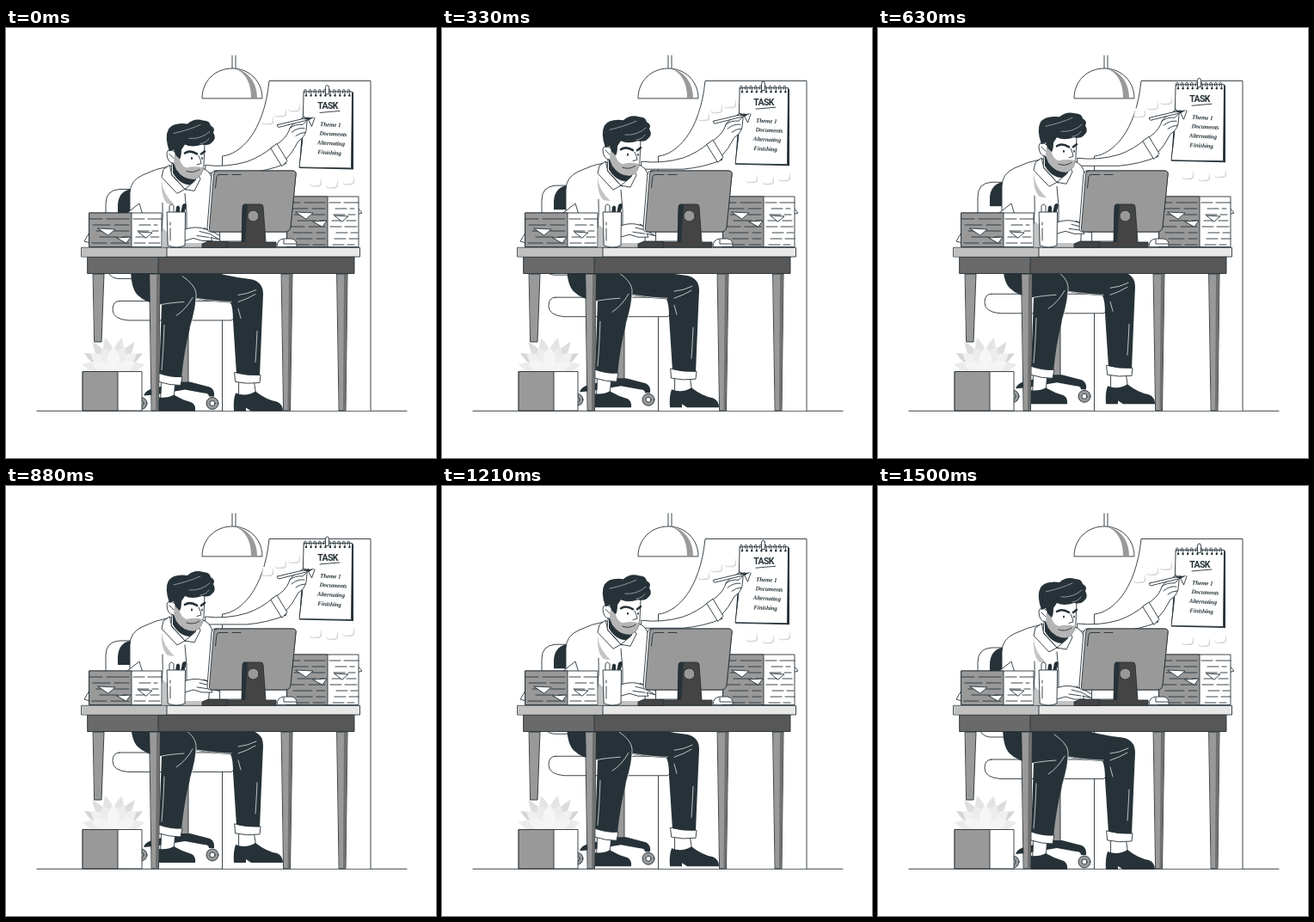
Recreate the animation shown at these times as an HTML page. Size 500x500 px, loop 1.54 s.

```html
<!DOCTYPE html>
<html lang="en">
<head>
<meta charset="utf-8">
<title>Office tasks</title>
<style>
  html, body { margin: 0; width: 100%; height: 100%; overflow: hidden; background: #fff; }
  svg { display: block; width: 100%; height: 100%; }
  svg * { stroke-linejoin: round; stroke-linecap: round; }
  .o { fill: #fff; stroke: #263238; stroke-width: .9; }
  .d { fill: #263238; }
  .g { fill: #999; stroke: #263238; stroke-width: .9; }
  .m { fill: #999; }
  .l { fill: none; stroke: #263238; stroke-width: .9; }
  .f { fill: none; stroke: #fff; stroke-width: .7; }
  .s { fill: #c4c4c4; }
  .title { font: 700 10.5px Roboto, sans-serif; font-stretch: 75%; letter-spacing: -.7px; fill: #263238; }
  .hand { font: italic 700 7px "Liberation Serif", cursive; letter-spacing: -.1px; fill: #263238; }
</style>
</head>
<body>
<svg viewBox="0 0 500 500">
  <!-- wall and lamp -->
  <path class="l" d="M36 445.3H466"/>
  <path class="o" d="M251.500 445V149C272 147 300 122 306 61.500H424V445"/>
  <path class="l" d="M263 32V47M267 32V47"/>
  <path class="o" d="M228 81.500C228 62 243 47 263 47S298 62 298 81.500Z"/>
  <path class="m" d="M267 47.500C280 53 285 66 285 81H292C292 66 284 51 267 47.500Z"/>

  <g id="float">
    <g id="notes"></g>

    <!-- notepad -->
    <path class="d" d="M347 74.500H404V164L341 162.500Z"/>
    <path class="o" d="M346.500 73.500H402.500L401.500 162.500L341 161.500Q346 130 345.500 100Z"/>
    <g id="rings"></g>
    <path class="o" d="M371.500 76V69Q371.500 66 373.500 66T375.500 69V76Z"/>
    <text class="title" x="374" y="94" text-anchor="middle">TASK</text>
    <path class="l" d="M365 98Q376 97 388 96"/>
    <g class="hand" transform="rotate(3 365 113)">
      <text x="365" y="113.500">Theme 1</text>
      <text x="365" y="124">Documents</text>
      <text x="363" y="135">Alternating</text>
      <text x="364" y="146">Finishing</text>
    </g>
    <path class="l" d="M352 107L355.500 114L359 104"/>

    <!-- chair -->
    <path class="o" d="M116 275V204Q116 188 132 187H150V291H130Q118 290 116 275Z"/>
    <path class="d" d="M130 215V205Q131 190 144 187H152V215Z"/>
    <path class="g" d="M203 340H212V413H203Z"/>
    <path class="d" d="M160 427Q162 420 174 418L200 411H214L237 417Q243 420 242 428H236Q236 424 230 424L208 420L172 426Z"/>
    <g class="g"><circle cx="240" cy="436" r="7"/><circle cx="157" cy="436" r="7"/></g>
    <g class="o"><circle cx="240" cy="436" r="3"/><circle cx="157" cy="436" r="3"/></g>
    <path class="o" d="M132 317H262Q269 318 269 327T262 339.500H142Q124 338 124 327Q124 317 132 317Z"/>

    <!-- legs and shoes -->
    <path class="o" d="M181 408H197L195 432H180ZM271 408H288L291 428H271Z"/>
    <path class="d" d="M178 429Q188 430 195 426Q205 432 216 435Q221 438 220 445H178ZM267 424Q279 429 290 422Q303 432 315 434Q322 437 322 445H285L279 441V445H265Q264 432 267 424Z"/>
    <path class="d" d="M185 278H222Q258 289 284 291.500Q299 294 299 309Q297 354 295 405L268 402L264 340Q264 324 261 319Q238 318 218 314Z"/>
    <path class="d" d="M145 278H205Q219 294 221 306Q222 322 214 348Q207 375 204 407L178 402L181 321Q163 320 153 310Q145 302 145 278Z"/>
    <path class="f" d="M205 288Q220 298 221 308Q222 322 214 348M181 321Q191 319 207 318M184 345Q183 375 181 397M198 334Q209 327 217 313M222 314Q247 318 262 318M270 310Q281 309 291 304M270 318Q282 314 290 309M292 352Q291 375 290 388M273 337L270 326"/>
    <path class="o" d="M178 401Q191 406 205 405L203 415Q190 415 178 411ZM266 400Q280 404 296 403L295 412Q280 414 267 411Z"/>

    <!-- raised arm and shirt -->
    <path class="o" d="M232 159Q256 162 280 155Q297 149 311 137L326 157Q304 166 280 168H232Z"/>
    <path class="o" d="M313 136Q325 129 329 119Q330 113 338 109L346 103Q351 103 350 109L349 119Q347 127 340 131Q333 145 325 153Z"/>
    <path class="o" d="M308 139L315 134L327 154L321 160Z"/>
    <path class="o" d="M316 112L352 103.500L353 106L317 115Q314 114 316 112Z"/>
    <path class="d" d="M344 105L359 103L352 106.500Z"/>
    <path class="l" d="M330 116Q336 111 345 112L349 108M332 121Q339 115 347 116M337 125Q342 121 348 121"/>
    <path class="o" d="M144 270V192Q144 177 159 170.500Q174 163 191 160L226 162Q239 165 240 178L235 270Z"/>
    <path class="s" d="M181 177Q182 192 196 205L188 204Q180 197 181 177ZM182 232L191 240L188 270H182Z"/>
    <path class="l" d="M208 192Q211 215 210 238M182 203Q183 219 181 236"/>
    <path class="o" d="M193 157L192 169L209 188L222 179V168Z"/>
    <path class="d" d="M194 157L194 168Q202 182 215 182L221 175Z"/>
    <path class="o" d="M190 159L183 164L181 173L199 192L208 187L193 171ZM222 166L226 175L219 189L208 187L220 177Z"/>

    <!-- head -->
    <path class="o" d="M197 134H231L230 158Q229 172 219 175.500Q206 176 198 164L195 157Q187 156 187 145Q188 138 197 144Z"/>
    <path class="s" style="fill:#b5b5b5" d="M196 146L201 149Q203 160 210 162Q217 160 225 161Q229 163 230 159Q229 172 219 175.500Q206 176 198 164L195 156Z"/>
    <path class="l" d="M210 166Q218 169 225 164"/>
    <path class="d" d="M190 143Q184 126 189 117Q195 109 211 111Q219 104 229 107Q237 107 238 113Q244 116 241 121Q245 128 240 132Q236 137 228 135Q216 139 208 135L204 141Q204 149 202 152L197 147L195 141Z"/>
    <path class="f" stroke-opacity=".7" d="M195 122Q213 118 226 112M213 128Q227 129 237 120M226 134Q233 133 236 128"/>
    <path d="M208 145Q214 141 222 146M227 146L231 143" fill="none" stroke="#263238" stroke-width="2.600"/>
    <path class="l" d="M224 148Q227 154 227 157L222 158.500M190 146L195 151"/>
    <g class="d"><ellipse cx="216" cy="151" rx="1" ry="1.600"/><ellipse cx="228" cy="151" rx=".8" ry="1.500"/></g>

    <!-- typing hand -->
    <path class="o" d="M204 235Q217 230 226 232L238 235L250 242Q251 246 246 245L238 243L240 247H228L218 244L204 248Z"/>
    <path class="l" d="M225 236L237 239L247 245M222 241L236 243M230 232L241 237"/>
  </g>

  <!-- desk -->
  <path class="s" d="M183 250H229V255H183Z"/>
  <path class="g" d="M101.500 286H114L111 365H103ZM320.500 286H333L330.500 445H323ZM385 286H397L395 445H387.500ZM167 286H179L177.500 445H169.500Z"/>
  <path d="M175 287L174 445H177L179 287ZM329 287L327.500 445H330L333 287ZM393 287L392 445H395L397 287Z" fill="#707070"/>
  <path d="M95 266H405V285.500H95Z" fill="#575757" stroke="#263238" stroke-width=".9"/>
  <path d="M95.500 266.500H177V285H95.500Z" fill="#6a6a6a"/>
  <path class="l" d="M177 266V286"/>
  <path d="M88 255.300H411.500V266H88Z" fill="#e8e8e8" stroke="#263238" stroke-width=".9"/>
  <path d="M88.500 255.800H187V265.500H88.500Z" fill="#c0c0c0"/>
  <path class="l" d="M187 255.500V266"/>

  <!-- paper stacks -->
  <path class="o" d="M141 215L155 204L159 217ZM97 238L91 248L98 250ZM408 208L414 215L408 217Z"/>
  <g id="stacks"></g>

  <!-- computer -->
  <path d="M228 255V251L235 248H258V255Z" fill="#444" stroke="#263238" stroke-width=".9"/>
  <path class="o" d="M249 234H276V248H249ZM315 254Q315 246 323 245H332Q339 246 338 254Z"/>
  <path class="l" d="M323 246V251H337"/>
  <path class="o" d="M243 166H333Q338 166 337 171L331 231Q330 237 325 237H238Q234 237 234 232L239 170Q240 166 243 166Z"/>
  <path class="g" d="M245 166H333Q338 166 337 171L331 231Q330 237 325 237H240Q236 237 236.500 232L241.500 170Q242 166 245 166Z"/>
  <path class="l" d="M243.500 186L245 173Q245.500 170.500 248 170.500H258M263 170.500H273"/>
  <path d="M278 205H296Q299 205 299 208L302 249H314V255H257V249H274L275 208Q275 205 278 205Z" fill="#444" stroke="#263238" stroke-width=".9"/>
  <path class="d" d="M278 205H281L278 249H274L275 208Q275 205 278 205Z"/>
  <circle class="g" cx="287.500" cy="218.500" r="6.500"/>

  <!-- pen cup -->
  <path class="o" d="M190 216V207Q192 203 195 207V216Z"/>
  <path class="d" d="M197 216L198 208Q200 205 202 208V216ZM203 216L205 206Q208 202 210 206L207 216Z"/>
  <path class="o" d="M187.500 214H208.500L208 253Q198 257 188.500 253Z"/>
  <path class="l" d="M191 247V233M191 229V226"/>

  <!-- plant -->
  <g id="plant"></g>
  <path class="o" d="M89.500 399.500H158V445H89.500Z"/>
  <path class="g" d="M89.500 399.500H130V445H89.500Z"/>
</svg>
<script>
  const byId = id => document.getElementById(id);
  const repeat = (list, draw) => list.map(draw).join('');
  const range = n => [...Array(n).keys()];

  byId('notes').innerHTML = repeat(
    [[303, 107], [318, 98], [334, 92], [359, 179], [378, 181], [397, 177]],
    ([x, y]) => `<path fill="#d6d6d6" d="M${x - 6} ${y + 1}l3 3 9-1 2-9v9l-3 2h-9z"/>
      <path fill="#fff" d="M${x - 4} ${y - 6}h11l-2 7-10 1z"/>`);

  byId('rings').innerHTML = repeat(range(10), i => {
    const x = 349 + i * 5.6;
    return `<path class="l" d="M${x} 78q1-7-1-7t-1 4"/><circle class="d" cx="${x}" cy="78" r="1.200"/>`;
  });

  // Each stack has a shaded side, a lit side, page lines and loose corners.
  byId('stacks').innerHTML = repeat(
    [[97, 146, 181, 215], [327, 374, 410, 196]],
    ([left, fold, right, top]) => `
      <path class="o" d="M${left} ${top}H${right}V254.500H${left}Z"/>
      <path class="g" d="M${left} ${top}H${fold}V254.500H${left}Z"/>` +
      repeat(range(Math.floor((252 - top) / 7)), i => {
        const y = top + 7 * (i + 1), a = left + i * 17 % 13, b = fold + 2 + i * 7 % 9;
        return `<path class="l" d="M${a} ${y}h${15 + i * 5 % 9}m5 0H${fold - 3}M${b} ${y}h13m4 0H${right - i * 5 % 6}"/>`;
      }) +
      `<path class="o" d="M${left + 10} ${top + 18}l20 1-8 7zM${fold - 17} ${top + 29}l16-1-5 7zM${fold + 8} ${top + 22}l16 1-7 6z"/>`);

  // Petals: angle, length, half width, colour, back row first.
  byId('plant').innerHTML = repeat(
    [[-58, 40, 6, '#d6d6d6'], [58, 40, 6, '#d6d6d6'], [-36, 42, 6, '#ddd'], [36, 42, 6, '#ddd'],
     [-14, 40, 7, '#e4e4e4'], [14, 40, 7, '#e4e4e4'], [-78, 37, 7, '#ebebeb'], [78, 37, 7, '#ebebeb'],
     [-52, 34, 8, '#f0f0f0'], [52, 34, 8, '#f0f0f0'], [-25, 31, 8, '#ececec'], [25, 31, 8, '#ececec'],
     [0, 28, 8, '#f6f6f6'], [-68, 27, 7, '#f4f4f4'], [68, 27, 7, '#f4f4f4']],
    ([angle, size, half, color]) => `<path fill="${color}" transform="translate(125 399) rotate(${angle})"
      d="M0 0C${-half * 1.4} ${-size * .4} ${-half} ${-size * .7} 0 ${-size}C${half} ${-size * .7} ${half * 1.4} ${-size * .4} 0 0"/>`);

  const LOOP = 1540, RISE = 10, LEAD = 40, REST = 1;
  const floating = byId('float');
  const start = performance.now();

  function frame() {
    const phase = (performance.now() - start + LEAD) % LOOP / LOOP;
    const lift = RISE * (1 - Math.abs(1 - 2 * phase));
    floating.setAttribute('transform', `translate(0 ${REST - lift})`);
    requestAnimationFrame(frame);
  }
  frame();
</script>
</body>
</html>
```
